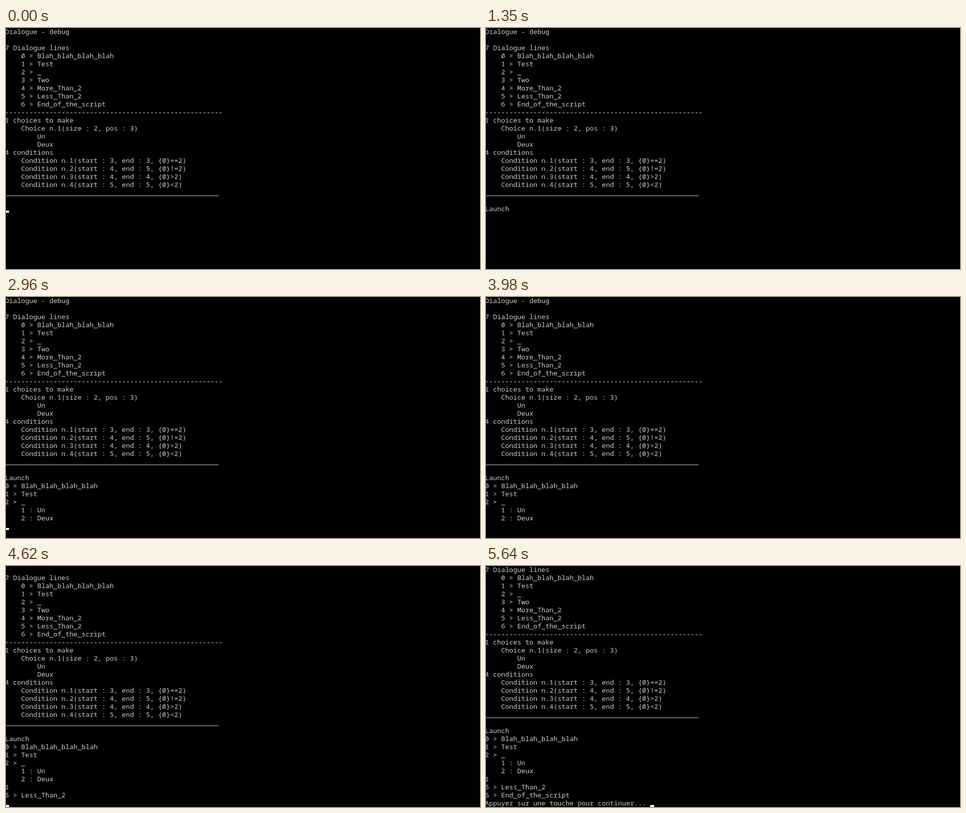
An HTML page with a canvas for the animation above (5.79 s loop, 941 by 479 pixels).

```html
<!DOCTYPE html>
<html lang="en">
<head>
<meta charset="utf-8">
<title>Dialogue debug console</title>
<style>
  html, body { margin: 0; width: 100%; height: 100%; overflow: hidden; background: #000; }
  canvas { display: block; }
</style>
</head>
<body>
<canvas id="screen" width="941" height="479"></canvas>
<script>
const LOOP = 5790;
const CELL_W = 8, CELL_H = 16, LEFT = -2, TOP = -1, BASELINE = 13, ROWS = 30;
const ctx = document.getElementById("screen").getContext("2d", { alpha: false });

const report = `Dialogue - debug

7 Dialogue lines
    0 > Blah_blah_blah_blah
    1 > Test
    2 > _
    3 > Two
    4 > More_Than_2
    5 > Less_Than_2
    6 > End_of_the_script
${"-".repeat(54)}
1 choices to make
    Choice n.1(size : 2, pos : 3)
        Un
        Deux
4 conditions
    Condition n.1(start : 3, end : 3, {0}==2)
    Condition n.2(start : 4, end : 5, {0}!=2)
    Condition n.3(start : 4, end : 4, {0}>2)
    Condition n.4(start : 5, end : 5, {0}<2)
${"_".repeat(53)}

`;

// [time in ms, text appended to the console, cursor shown]
const events = [
  [0, report, true],
  [100, "", false],
  [190, "L", true],
  [270, "a", true],
  [360, "u", true],
  [560, "n", true],
  [690, "c", true],
  [840, "h", false],
  [870, "", true],
  [1350, "", false],
  [1480, "\n0 > Blah_blah_blah_blah\n", true],
  [1990, "1 > Test\n", true],
  [2450, "2 > _\n", true],
  [2960, "    1 : Un\n    2 : Deux\n", true],
  [3980, "", false],
  [4110, "1", true],
  [4490, "", false],
  [4620, "\n5 > Less_Than_2\n", true],
  [5130, "6 > End_of_the_script\n", true],
  [5640, "Appuyez sur une touche pour continuer... ", true],
];

function draw(time) {
  const past = events.filter(([start]) => start <= time);
  const lines = past.map(([, text]) => text).join("").split("\n").slice(-ROWS);
  const cursorOn = past[past.length - 1][2];

  ctx.fillStyle = "#000";
  ctx.fillRect(0, 0, 941, 479);

  ctx.font = '13.333px "Noto Sans Mono", "DejaVu Sans Mono", monospace';
  ctx.fillStyle = "#ccc";
  lines.forEach((line, row) => {
    [...line].forEach((char, col) => {
      ctx.fillText(char, LEFT + col * CELL_W, TOP + row * CELL_H + BASELINE);
    });
  });

  if (cursorOn) {
    const row = lines.length - 1;
    ctx.fillStyle = "#fff";
    ctx.fillRect(LEFT + lines[row].length * CELL_W, TOP + row * CELL_H + 12, CELL_W, 4);
  }
}

const startTime = performance.now();
function tick() {
  draw((performance.now() - startTime) % LOOP);
  requestAnimationFrame(tick);
}
tick();
</script>
</body>
</html>
```
